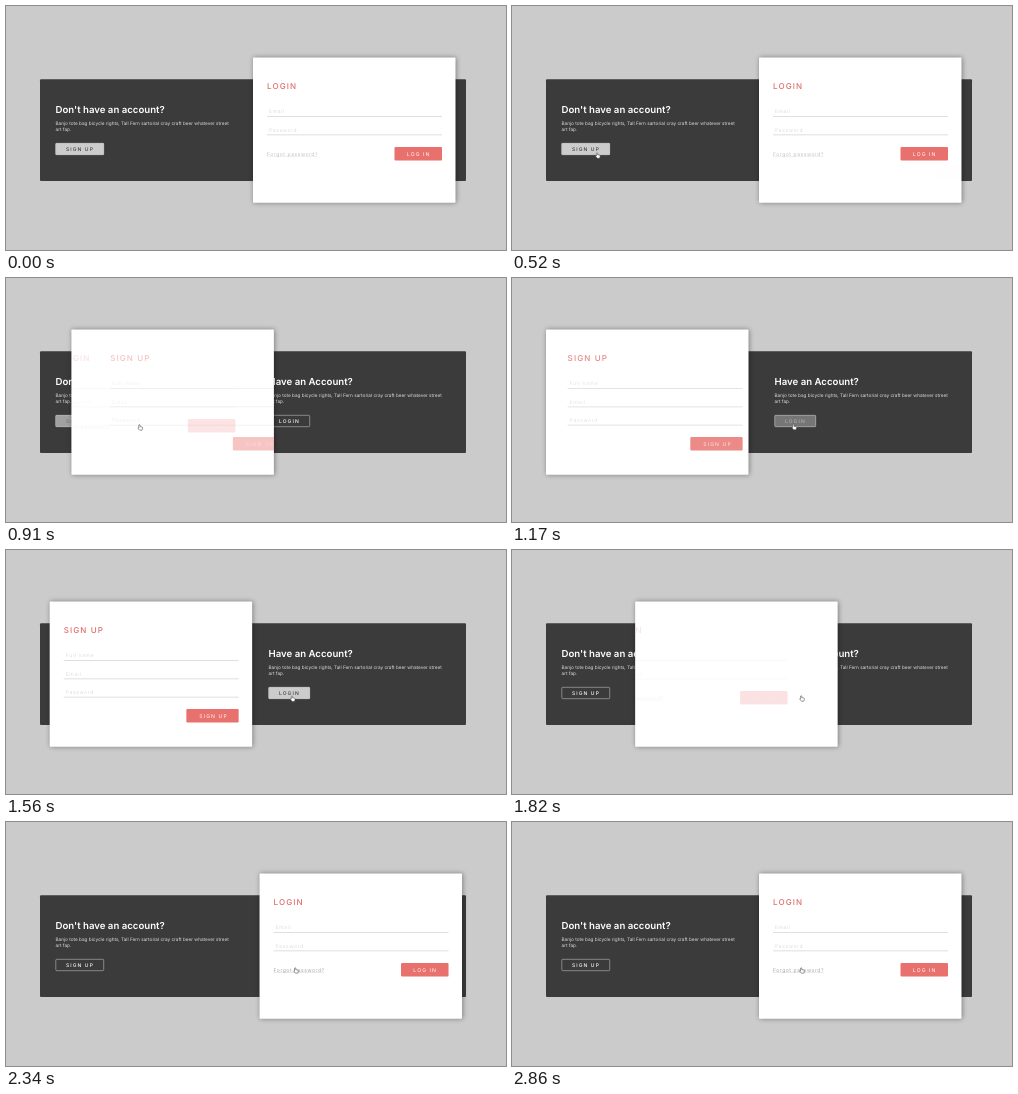
Recreate the animation shown at these times as an HTML page with a canvas. Size 500 by 244 pixels, loop 3.25 s.

```html
<!DOCTYPE html>
<html lang="en">
<head>
<meta charset="utf-8">
<style>
  html, body { margin: 0; width: 100%; height: 100%; overflow: hidden; background: #ccc; }
  canvas { display: block; width: 500px; height: 244px; }
</style>
</head>
<body>
<canvas id="stage"></canvas>
<script>
const W = 500, H = 244, LOOP = 3250, STEP = 130;
const canvas = document.getElementById('stage');
const ctx = canvas.getContext('2d');
const dpr = window.devicePixelRatio || 1;
canvas.width = W * dpr;
canvas.height = H * dpr;

const PANEL = { left: 44.5, y: 51.5, w: 202.5, h: 145.3, travel: 202.5, bounce: 10.5 };
const FORM = { inset: 14, w: 175, slide: 42 };
const RED = [232, 113, 109], RED_HOVER = [225, 70, 65];
const DARK = [59, 59, 59], LIGHT = [204, 204, 204], WHITE = [255, 255, 255];

const clamp = v => Math.min(1, Math.max(0, v));
const mix = (a, b, k) => a + (b - a) * k;
const progress = (t, start, length) => clamp((t - start) / length);
const blend = (a, b, k) => `rgb(${a.map((v, i) => Math.round(mix(v, b[i], k))).join(',')})`;

function bezier(x1, y1, x2, y2) {
  const at = (a, b, s) => 3 * a * s * (1 - s) ** 2 + 3 * b * s * s * (1 - s) + s ** 3;
  return x => {
    let lo = 0, hi = 1;
    for (let i = 0; i < 24; i++) {
      const mid = (lo + hi) / 2;
      if (at(x1, x2, mid) < x) lo = mid; else hi = mid;
    }
    return at(y1, y2, (lo + hi) / 2);
  };
}
const ease = bezier(.25, .1, .25, 1);
const easeInOut = bezier(.42, 0, .58, 1);

// Overshoots the resting place, then settles back.
function bounce(t, start, out, back, from, peak, rest) {
  const there = start + out;
  return t < there
    ? mix(from, peak, ease(progress(t, start, out)))
    : mix(peak, rest, ease(progress(t, there, back)));
}

function panelX(t) {
  const { left, travel, bounce: over } = PANEL, right = left + travel;
  return t < 1691
    ? bounce(t, 582, 590, 590, right, left - over, left)
    : bounce(t, 1691, 555, 398, left, right + over, right);
}

function rect(x, y, w, h, fill, radius = 1) {
  ctx.beginPath();
  ctx.roundRect(x, y, w, h, radius);
  ctx.fillStyle = fill;
  ctx.fill();
}

function text(str, x, y, size, color, spacing = 0, weight = 400) {
  ctx.font = `${weight} ${size}px Inter, "Open Sans", sans-serif`;
  ctx.letterSpacing = spacing + 'px';
  ctx.fillStyle = color;
  ctx.fillText(str, x, y);
}

function outlineButton(label, x, w, hover) {
  const y = 137;
  if (hover > 0) {
    ctx.globalAlpha = hover;
    rect(x, y, w, 12, blend(LIGHT, WHITE, 0));
    ctx.globalAlpha = 1;
  }
  ctx.beginPath();
  ctx.roundRect(x + .3, y + .3, w - .6, 11.4, 1);
  ctx.strokeStyle = '#bbb';
  ctx.lineWidth = .6;
  ctx.stroke();
  text(label, x + 10.4, 144.8, 5, blend(WHITE, DARK, hover), 1.1, 500);
}

function prompt(x, title, button, buttonW, hover) {
  text(title, x, 107.3, 9.63, '#fff', 0, 600);
  text('Banjo tote bag bicycle rights, Tall Fern sartorial cray craft beer whatever street', x, 118.7, 4.7, '#ddd');
  text('art fap.', x, 125, 4.7, '#ddd');
  outlineButton(button, x, buttonW, hover);
}

function form(x, alpha, title, fields, drawActions) {
  if (alpha <= 0) return;
  ctx.globalAlpha = alpha;
  text(title, x, 82.9, 8, blend(RED, DARK, .05), 1.1, 500);
  fields.forEach((label, i) => {
    const y = 107.3 + i * 18.2;
    text(label, x + 2, y, 5, '#d2d2d2', .7, 300);
    rect(x, y + 3, FORM.w, .7, '#d4d4d4', 0);
  });
  drawActions(x);
  ctx.globalAlpha = 1;
}

function redButton(label, right, y, w, textInset, hover = 0) {
  rect(right - w, y, w, 13.5, blend(RED, RED_HOVER, hover));
  text(label, right - w + textInset, y + 8.7, 5.1, '#fff', 1.1);
}

function loginForm(x, t) {
  let away, alpha;
  if (t < 1674) {
    away = easeInOut(progress(t, 582, 590));
    alpha = 1 - easeInOut(progress(t, 582, 472));
  } else {
    away = 1 - easeInOut(progress(t, 1674, 584));
    alpha = easeInOut(progress(t, 1674, 470));
  }
  const buttonHover = progress(t, 1830, 100) * (1 - progress(t, 1990, 200));
  const linkHover = progress(t, 1990, 150);
  form(x + FORM.inset - FORM.slide * away, alpha, 'LOGIN', ['Email', 'Password'], left => {
    const color = blend(LIGHT, [165, 165, 165], .3 + .7 * linkHover);
    text('Forgot password?', left, 149.8, 5, color, .55);
    rect(left, 150.7, 50.5, .4, color, 0);
    redButton('LOG IN', left + FORM.w, 141, 47.5, 12.3, buttonHover);
  });
}

function signupForm(x, t) {
  const shown = t < 1700 ? easeInOut(progress(t, 456, 1013)) : 0;
  form(x + FORM.inset + FORM.slide * (1 - shown), shown, 'SIGN UP',
    ['Full name', 'Email', 'Password'],
    left => redButton('SIGN UP', left + FORM.w, 159, 52.3, 13));
}

function panel(t) {
  const x = panelX(t), { y, w, h } = PANEL;
  ctx.save();
  ctx.shadowColor = 'rgba(0,0,0,.4)';
  ctx.shadowBlur = 5.5 * dpr;
  ctx.shadowOffsetX = .7 * dpr;
  rect(x, y, w, h, '#fff');
  ctx.restore();
  ctx.save();
  ctx.beginPath();
  ctx.rect(x, y, w, h);
  ctx.clip();
  signupForm(x, t);
  loginForm(x, t);
  ctx.restore();
}

function pointer(t) {
  if (t < 520) return;
  const across = easeInOut(progress(t, 800, 320));
  const drift = progress(t, 1300, 450);
  ctx.save();
  ctx.translate(mix(84.4, 280.8, across) + 7.8 * drift, mix(146.7, 146.2, across) - .6 * drift);
  ctx.beginPath();
  ctx.moveTo(0, .4);
  ctx.quadraticCurveTo(.6, -.5, 1.2, .4);
  ctx.lineTo(1.2, 2);
  ctx.lineTo(3.4, 2.5);
  ctx.quadraticCurveTo(3.9, 2.7, 3.8, 3.5);
  ctx.lineTo(3.2, 5.6);
  ctx.lineTo(.8, 5.6);
  ctx.lineTo(-1, 3.3);
  ctx.quadraticCurveTo(-.8, 2.7, 0, 3.2);
  ctx.closePath();
  ctx.fillStyle = '#fff';
  ctx.fill();
  ctx.strokeStyle = '#444';
  ctx.lineWidth = .55;
  ctx.stroke();
  ctx.restore();
}

function draw(t) {
  ctx.setTransform(dpr, 0, 0, dpr, 0, 0);
  ctx.textRendering = 'geometricPrecision';
  rect(0, 0, W, H, '#cbcbcb', 0);
  rect(34, 73.3, 426, 101.7, blend(DARK, DARK, 0));
  prompt(49.5, "Don't have an account?", 'SIGN UP', 48.5, 1 - progress(t, 850, 200));
  prompt(262.5, 'Have an Account?', 'LOGIN', 41.5, progress(t, 1080, 220));
  panel(t);
  pointer(t);
}

const begin = performance.now();
function tick() {
  const t = (performance.now() - begin) % LOOP;
  draw(Math.floor(t / STEP) * STEP);
  requestAnimationFrame(tick);
}
tick();
</script>
</body>
</html>
```
